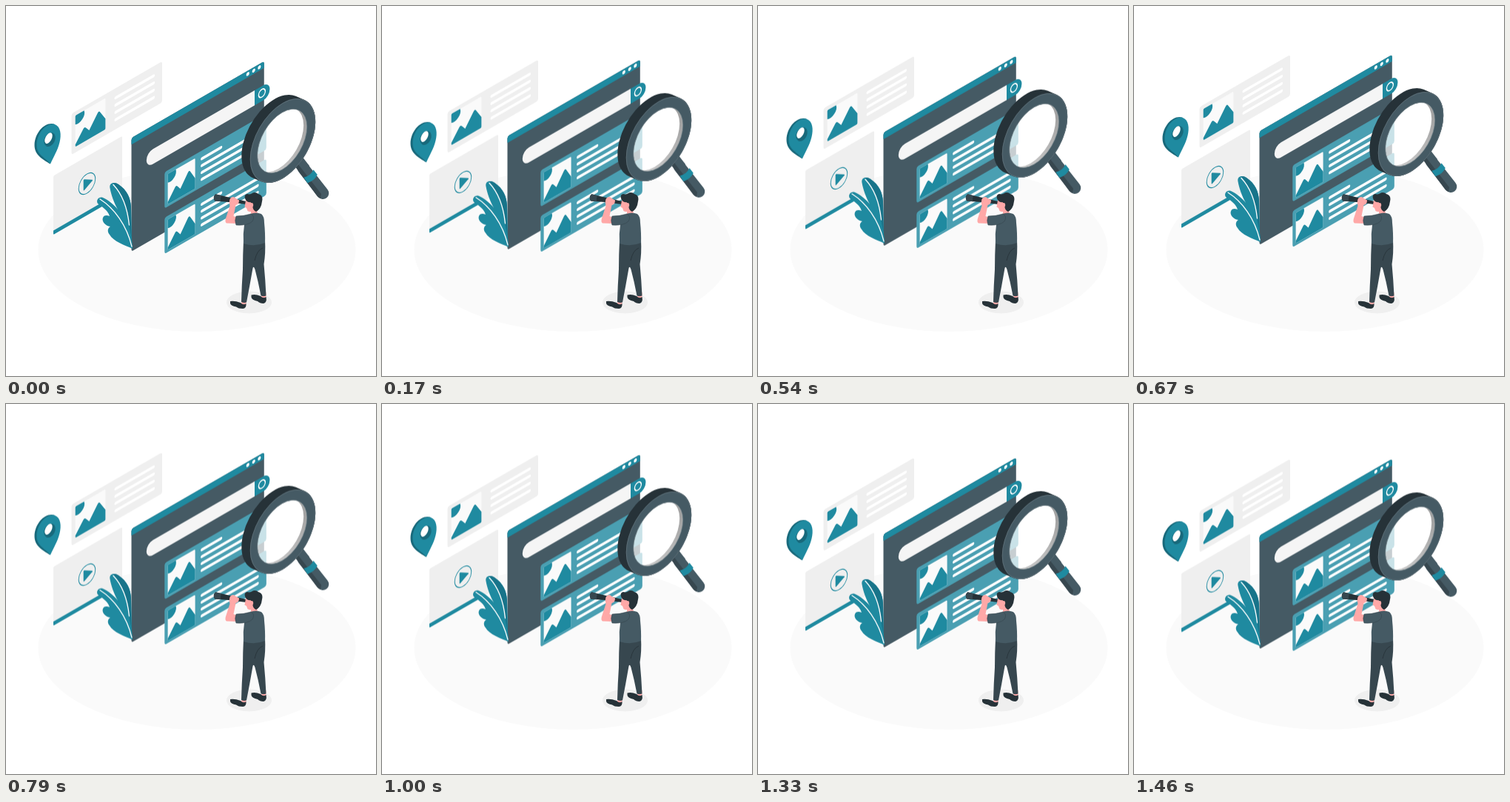
Recreate the animation shown at these times as an HTML page. Size 500x500 px, loop 1500 ms.

```html
<!DOCTYPE html>
<html lang="en">
<head>
<meta charset="utf-8">
<title>Search illustration</title>
<style>
  html, body { margin: 0; width: 100%; height: 100%; overflow: hidden; background: #fff; }
  svg { display: block; width: 100vw; height: 100vh; }
  .float { animation: float 1.5s linear infinite; }
  @keyframes float { 50% { transform: translateY(-10px); } }
  .teal { fill: #1f8aa0; }
  .deep { fill: #18697b; }
  .slate { fill: #455a64; }
  .navy { fill: #37474f; }
  .ink { fill: #263238; }
  .skin { fill: #ffa8a7; }
  .pale { fill: #efefef; }
  .rows { fill: none; stroke: #fff; stroke-linecap: round; }
  .rib { fill: none; stroke: #fff; stroke-width: 1.3; stroke-linecap: round; }
</style>
</head>
<body>
<svg viewBox="0 0 500 500">
  <defs>
    <g id="picture">
      <rect width="42.7" height="41" rx="1.5" fill="#fafafa"/>
      <path class="teal" d="M0 38L11.5 23.4Q13 21.6 15 24L19.6 29.8L31.6 13.6Q33.5 11.5 35 14L42.7 27V39.5Q42.7 41 41.2 41H1.5Q0 41 0 39.5Z"/>
      <path class="teal" d="M0 1.5Q0 0 1.5 0H12.5A9.5 9.5 0 0 1 0 11.8Z"/>
    </g>
    <g id="result">
      <rect width="158.8" height="49" rx="3" fill="#4a9fb2"/>
      <use href="#picture" x="5" y="5"/>
      <path class="rows" stroke-width="4" d="M58.3 10.8H88M58.3 20.1H145M58.3 29.4H145M58.3 38.7H145"/>
    </g>
    <clipPath id="lens"><circle cx="-1" r="38.6"/></clipPath>
    <mask id="rim" maskUnits="userSpaceOnUse" x="-90" y="-90" width="180" height="180">
      <path fill="#fff" d="M-90-90H90V90H-90Z"/>
      <circle cx="-1" r="38.6"/>
    </mask>
    <linearGradient id="wall" x1="1" y1="0" x2="0" y2="1">
      <stop offset=".25" stop-color="#a3a3a3"/>
      <stop offset="1" stop-color="#d6d6d6"/>
    </linearGradient>
  </defs>

  <ellipse cx="258" cy="329.5" rx="214.5" ry="110.5" fill="#fafafa"/>
  <ellipse cx="328.5" cy="400.5" rx="30.5" ry="15" fill="#efefef"/>

  <g class="float">
    <!-- map pin -->
    <path class="deep" d="M66 160C55 155 39 169 38.5 188C38.5 202 50 207 59.5 213.5Z"/>
    <path class="teal" d="M66 160C74 163 75 174 72.5 184C70 195 64 204 60 213.5C55 206 42 202 41.5 189C41 172 55 157 66 160Z"/>
    <g transform="rotate(27 59 180.5)">
      <ellipse class="deep" cx="59" cy="180.5" rx="7" ry="10"/>
      <ellipse cx="56.8" cy="179.5" rx="4.2" ry="8" fill="#fff"/>
    </g>

    <!-- grey cards -->
    <g transform="matrix(.866 -.5 0 1 88.5 145.5)">
      <rect class="pale" width="141.5" height="55.5" rx="3"/>
      <use href="#picture" transform="translate(6 5.5) scale(1.1 1.03)"/>
      <path class="rows" stroke-width="4" d="M69 13H128M69 22.8H128M69 32.6H128M69 42.4H128"/>
    </g>
    <g transform="matrix(.866 -.5 0 1 64 229.5)">
      <rect class="pale" width="107.4" height="79" rx="2"/>
      <path class="teal" d="M0 74H78V79.5H1.5Q0 79.5 0 78Z"/>
      <circle cx="52.5" cy="36.8" r="13" fill="none" stroke="#1f8aa0" stroke-width="1.1"/>
      <path class="teal" d="M48.5 29L60.7 35.6Q61.7 36.3 60.7 37L48.5 43.5Q47 44 47 42.8V29.7Q47 28.5 48.5 29Z"/>
    </g>

    <!-- browser window -->
    <g transform="matrix(.866 -.5 0 1 169.5 178.3)">
      <rect class="slate" width="207" height="153.5" rx="3"/>
      <path class="teal" d="M0 9V3Q0 0 3 0H204Q207 0 207 3V9Z"/>
      <g fill="#fff"><circle cx="181.6" cy="4.4" r="2.4"/><circle cx="190.8" cy="4.4" r="2.4"/><circle cx="199.6" cy="4.4" r="2.4"/></g>
    </g>
    <g transform="matrix(.866 -.5 0 1 190 198.2)">
      <path fill="#f5f5f5" d="M168.6 0H10A10.2 10.2 0 0 0 10 20.4H168.6Z"/>
      <path class="teal" d="M168.6 0H182A10.2 10.2 0 0 1 182 20.4H168.6Z"/>
      <circle cx="180" cy="9.6" r="5.2" fill="none" stroke="#fff" stroke-width="1.6"/>
    </g>
    <use href="#result" transform="matrix(.866 -.5 0 1 214.3 224.5)"/>
    <use href="#result" transform="matrix(.866 -.5 0 1 214.3 286)"/>

    <!-- leaves -->
    <path class="teal" d="M170 322C160 302 151 289 143 277C146 274 149 274 151 275C146 266 142 255 140.5 246C139 239 146 237 152 241C164 249 168.5 260 169 272Z"/>
    <path fill="#18748a" d="M170 322L166.5 296C164 272 156 253 145 239Q149 238.5 152 241C164 249 168.5 260 169 272Z"/>
    <path class="rib" d="M145 241.5C156 253 164 272 166.5 296"/>
    <path class="teal" d="M171 328C160 323 145 318 140 309C136 304 138 300 141 298C134 297 129 291 131 286C133 282 137 283 140 284C137 275 129 271 124 267C121 262 126 257 131 259C145 265 160 283 166 299C170 312 171 320 171 328Z"/>
    <path class="rib" d="M127 261C146 273 163 296 170 325"/>

    <!-- magnifying glass -->
    <path d="M394 208L404 221" stroke="#455a64" stroke-width="15.5"/>
    <path d="M402 219.5L428.3 253" stroke="#455a64" stroke-width="16" stroke-linecap="round"/>
    <path class="navy" d="M387 212L391 209L426 254L425 260Q422 259 420.5 257Z"/>
    <path class="teal" d="M402.4 231.8Q411.5 229.5 415.5 221.2L420.8 228Q416.5 236.5 407.4 239.2Z"/>
    <g transform="matrix(.866 -.5 0 1 374 182)">
      <g clip-path="url(#lens)">
        <circle r="40" fill="#fff" fill-opacity=".7"/>
        <path fill="url(#wall)" fill-rule="evenodd" d="M-40 0a40 40 0 1 0 80 0a40 40 0 1 0-80 0M-45.5-4.5a39 39 0 1 0 78 0a39 39 0 1 0-78 0"/>
      </g>
      <path d="M0 0L-13.3-11.6" stroke="#263238" stroke-width="102" stroke-linecap="round" mask="url(#rim)"/>
      <circle class="slate" r="51" mask="url(#rim)"/>
      <circle r="50.6" fill="none" stroke="#6a7b83" stroke-width=".6"/>
      <circle cx="-1" r="38.6" fill="none" stroke="#8a979d" stroke-width=".7"/>
    </g>
  </g>

  <!-- man with spyglass -->
  <path class="skin" d="M318.5 396H325L324 405H318ZM345 387H351.5L351 397H345.5Z"/>
  <path class="ink" d="M303 399Q309 398 317 401Q321 405 324.5 402Q325 409 320 409Q314 409 311 406.5Q304 405 303 402ZM331.5 390.5Q337 389 344 392Q348 396 351.5 393Q353 401 348 402Q343 402 340 399Q332 397 331.5 393.5Z"/>
  <path class="navy" d="M321 317H350Q351 334 348.5 349Q350.5 370 351.5 391.5Q348 393 344.5 391.5Q341 373 336.5 356Q334 349 333 357Q329 380 325 400.5Q321.5 401.5 318 400Q318.5 378 320 356Q320 336 321 317Z"/>
  <path d="M347 327Q339 330 336 344" fill="none" stroke="#263238" stroke-width=".8"/>
  <path class="skin" d="M331 274H339L340 282Q335 285 331 281Z"/>
  <path class="slate" d="M330 281Q338 278 345 281Q349 284 349 293Q350.5 308 350 320Q336 326 321 321Q320 308 322 296Z"/>
  <path class="ink" d="M283 254.2L302 258.8L324.5 264V268L301 265L282 263.6Q279 258 283 254.2Z"/>
  <path class="navy" d="M283.5 254.2L291.5 256.2Q289 260 290.5 264.3L282.5 263.6Q279 258 283.5 254.2Z"/>
  <path class="skin" d="M303 260Q307 256 310.5 260L315 262.5Q315 268 310.5 269L307.5 284L313 286V294L298 293.5Q295.5 292 297 287L302.5 270Q301 264 303 260Z"/>
  <path class="slate" stroke="#37474f" stroke-width=".6" d="M311 284Q321 284 331 281Q337 284 333 291Q327 297 311 296Q308.5 290 311 284Z"/>
  <path class="skin" d="M324.5 260L336 261L337 275Q331 279.5 326.5 277L325 273L322.5 271.5Z"/>
  <path class="ink" d="M323 260Q321.5 255 326 254Q329 255 332 253.5Q337 250.5 341 254Q348 256 346 264Q345 274 338 278Q334 276 333.5 272L330.5 265Q325 266 323 260Z"/>
  <ellipse class="skin" cx="332" cy="269" rx="2.2" ry="3"/>
</svg>
</body>
</html>
```
